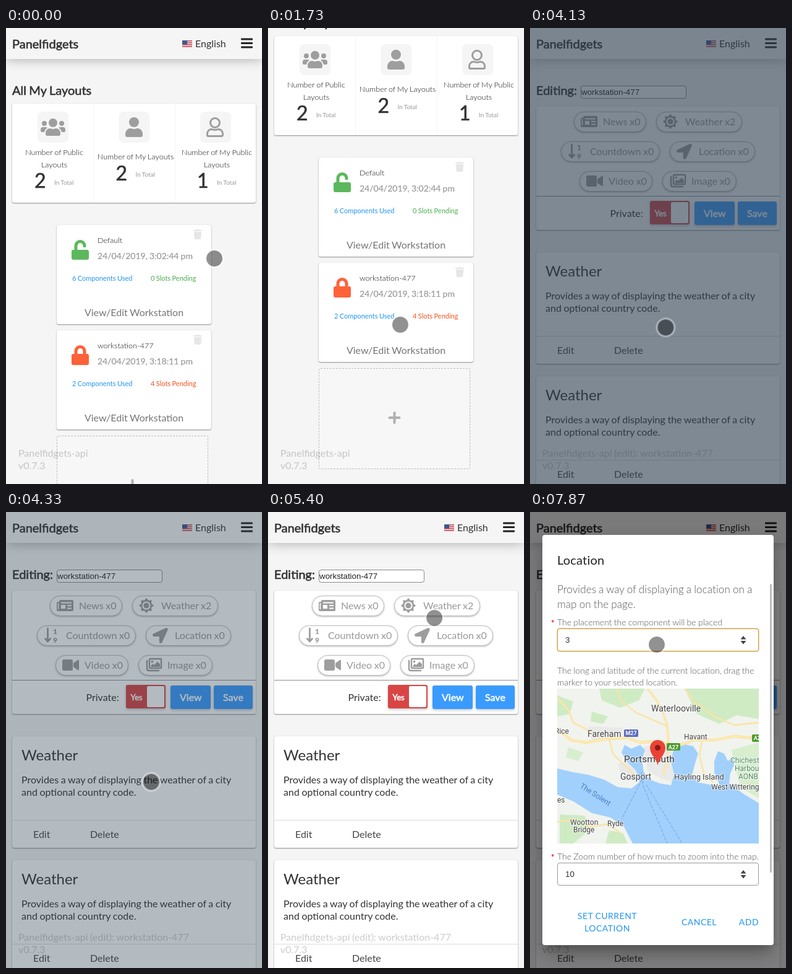
An HTML page for the animation above (8 s loop, 414 by 736 pixels).

```html
<!DOCTYPE html>
<html lang="en">
<head>
<meta charset="utf-8">
<title>Layout manager</title>
<style>
html,body{margin:0;width:100%;height:100%;overflow:hidden;background:#f5f5f5}
#stage{position:relative;width:414px;height:736px;overflow:hidden;background:#f5f5f5}
#stage div,.layer>svg{position:absolute;box-sizing:border-box}
.layer,.layer>svg{left:0;top:0;width:414px;height:736px}
.layer>svg{overflow:visible}
text{font-family:Lato,sans-serif;white-space:pre;word-spacing:-.035em}
text.ui{font-family:"Liberation Sans",Arial,sans-serif}
text.map{font-family:Roboto,sans-serif;paint-order:stroke;stroke:#fff;stroke-width:2px;stroke-opacity:.7}
.fat{stroke:currentColor;stroke-width:.6px}
.thin{font-weight:300}
.head{background:#f5f5f5;box-shadow:0 0 20px rgba(0,0,0,.32)}
.card{background:#fff;border-radius:3px;box-shadow:0 1px 2px rgba(0,0,0,.42),0 0 1px rgba(0,0,0,.2)}
.slot{border:1px dashed #bbb;border-radius:3px;background:#f7f7f7}
.chip{background:#fff;border:1px solid #bdbdbd;border-radius:17px;box-shadow:0 1px 3px rgba(0,0,0,.3)}
.name{background:#fff;border:1px solid #8a8a8a;border-radius:4px}
.btn{background:#3a9bff;border-radius:3px;box-shadow:0 2px 4px rgba(0,0,0,.22)}
.red{background:#d84545}
.knob{background:#fff;border-radius:2px}
.select{background:#fff;border:1px solid #9a9a9a;border-radius:4px}
.focus{border-color:#d09a38;box-shadow:0 0 1px 0.5px rgba(208,154,56,.7)}
.panel{background:#fff;border-radius:4px;box-shadow:0 11px 15px -7px rgba(0,0,0,.2),0 16px 30px rgba(0,0,0,.25)}
.tint{background:#f0f7ff}
.anim{animation:8s linear infinite}
#home{animation-name:home}
#scroll{animation-name:scroll}
#edit{animation-name:edit}
#hover{animation-name:hover}
#veil{background:#2c3e50;animation-name:veil}
#shade{background:rgba(0,0,0,.5);animation-name:shade}
#modal{transform-origin:207px 368px;animation-name:modal}
#map{animation-name:map}
#bar{background:#bdbdbd;border-radius:2px;animation-name:bar}
#cubes{animation-name:cubes}
.cube{left:187px;top:348px;width:15px;height:15px;background:#f8f8f8;animation-timing-function:ease-in-out}
#c1{animation-name:c1}
#c2{animation-name:c2}
#dot{left:-16px;top:-16px;width:32px;height:32px;border-radius:50%;border:3px solid rgba(255,255,255,.36);background:rgba(0,0,0,.43);background-clip:padding-box;animation-name:dot}
@keyframes home{0%,45%{visibility:visible}45.01%,100%{visibility:hidden}}
@keyframes edit{0%,45%{visibility:hidden}45.01%,100%{visibility:visible}}
@keyframes scroll{
0%,6.8%{transform:none;animation-timing-function:ease-in-out}
11.6%,12.7%{transform:translateY(-100px)}
15%,100%{transform:translateY(-109px)}}
@keyframes veil{0%,32.9%{opacity:0}41.6%,47.75%{opacity:1}57.7%,100%{opacity:0}}
@keyframes cubes{0%,47.75%{visibility:visible}47.76%,100%{visibility:hidden}}
@keyframes c1{
0%,31.5%{transform:none}
37.125%{transform:translate(42px,0) rotate(-90deg) scale(.5)}
42.75%{transform:translate(42px,42px) rotate(-180deg)}
48.375%,100%{transform:translate(0,42px) rotate(-270deg) scale(.5)}}
@keyframes c2{
0%,31.5%{transform:translate(42px,42px) rotate(-180deg)}
37.125%{transform:translate(0,42px) rotate(-270deg) scale(.5)}
42.75%{transform:translate(0,0) rotate(-360deg)}
48.375%,100%{transform:translate(42px,0) rotate(-450deg) scale(.5)}}
@keyframes hover{0%,82.6%{opacity:0}84.7%,100%{opacity:1}}
@keyframes shade{0%,85.7%{opacity:0}89.5%,100%{opacity:1}}
@keyframes modal{
0%,85.7%{opacity:0;transform:scale(.8);animation-timing-function:ease-out}
89.5%,100%{opacity:1;transform:none}}
@keyframes map{0%,89.8%{opacity:0}91.5%,100%{opacity:1}}
@keyframes bar{0%,93.6%{opacity:0}95.5%,100%{opacity:1}}
@keyframes dot{
0%,.2%{transform:translate(337px,372px)}
2.5%,4.5%{transform:translate(343px,349px);animation-timing-function:ease-in-out}
10%,18.4%{transform:translate(221px,267px)}
21.625%{transform:translate(214px,478px);animation-timing-function:ease-out}
24.4%{transform:translate(199px,584px);animation-timing-function:ease-in-out}
28.3%,49.5%{transform:translate(206px,524px)}
54.125%{transform:translate(235px,436px)}
58.3%{transform:translate(182px,305px);animation-timing-function:ease-out}
67.5%{transform:translate(269px,171px)}
69.1%,69.3%{transform:translate(278px,168px)}
75%{transform:translate(319px,193px)}
79.1%,93.5%{transform:translate(316px,206px);animation-timing-function:ease-in-out}
98.2%,100%{transform:translate(205px,214px)}}
</style>
</head>
<body>
<div id="stage"></div>
<script>
const GREY = '#9e9e9e', INK = '#333';
const box = (cls, x, y, w, h, attr = '') =>
  `<div class="${cls}" ${attr} style="left:${x}px;top:${y}px;width:${w}px;height:${h}px"></div>`;
const svg = (...parts) => `<svg viewBox="0 0 414 736">${parts.join('')}</svg>`;
const text = (x, y, str, size = 16, fill = INK, attr = '') =>
  `<text x="${x}" y="${y}" font-size="${size}" fill="${fill}" color="${fill}" ${attr}>${str}</text>`;
const icon = (name, x, y, scale, fill = GREY) =>
  `<path d="${ICONS[name]}" fill="${fill}" transform="translate(${x} ${y}) scale(${scale})"/>`;
const shape = (d, fill) => `<path d="${d}" fill="${fill}"/>`;
const line = (d, color, width, attr = '') =>
  `<path d="${d}" fill="none" stroke="${color}" stroke-width="${width}" ${attr}/>`;
const disc = (x, y, r, fill) => `<circle cx="${x}" cy="${y}" r="${r}" fill="${fill}"/>`;
const rect = (x, y, w, h, fill, r = 0) =>
  `<rect x="${x}" y="${y}" width="${w}" height="${h}" rx="${r}" fill="${fill}"/>`;
const FAT = 'class="fat"', THIN = 'class="thin"', MID = 'text-anchor="middle"';

const ICONS = {
  user: 'M224 256a128 128 0 1 0 0-256 128 128 0 0 0 0 256zm90 32h-17a175 175 0 0 1-146 0h-17A134 134 0 0 0 0 422v42a48 48 0 0 0 48 48h352a48 48 0 0 0 48-48v-42A134 134 0 0 0 314 288z',
  pals: 'M96 224a64 64 0 1 0 0-128 64 64 0 0 0 0 128zM544 224a64 64 0 1 0 0-128 64 64 0 0 0 0 128zM576 256h-64a64 64 0 0 0-45 19c40 22 69 62 75 109h66a32 32 0 0 0 32-32v-32a64 64 0 0 0-64-64zM173 275a64 64 0 0 0-45-19H64a64 64 0 0 0-64 64v32a32 32 0 0 0 32 32h66c6-47 35-87 75-109z',
  chief: 'M320 256a112 112 0 1 0 0-224 112 112 0 0 0 0 224zM397 288h-9a158 158 0 0 1-136 0h-9A115 115 0 0 0 128 403v29a48 48 0 0 0 48 48h288a48 48 0 0 0 48-48v-29A115 115 0 0 0 397 288z',
  unlock: 'M400 256H152V153a73 73 0 0 1 71-73 72 72 0 0 1 73 72v16a24 24 0 0 0 24 24h32a24 24 0 0 0 24-24v-16A152 152 0 0 0 72 153v103H48a48 48 0 0 0-48 48v160a48 48 0 0 0 48 48h352a48 48 0 0 0 48-48V304a48 48 0 0 0-48-48z',
  lock: 'M400 224h-24v-72a152 152 0 0 0-304 0v72H48a48 48 0 0 0-48 48v192a48 48 0 0 0 48 48h352a48 48 0 0 0 48-48V272a48 48 0 0 0-48-48zm-104 0H152v-72a72 72 0 0 1 144 0z',
  trash: 'M432 32H312l-9-19A24 24 0 0 0 281 0H167a24 24 0 0 0-22 13l-9 19H16A16 16 0 0 0 0 48v32a16 16 0 0 0 16 16h416a16 16 0 0 0 16-16V48a16 16 0 0 0-16-16zM53 467a48 48 0 0 0 48 45h246a48 48 0 0 0 48-45l21-339H32z',
  arrow: 'M444 4L29 195c-48 23-32 93 19 93h176v176c0 51 70 67 93 19L508 68c16-39-25-80-64-64z'
};

const head = box('head', 0, 0, 414, 50) + svg(
  text(10, 33, 'Panelfidgets', 20, INK, FAT),
  rect(285, 20, 16, 11, '#f3e9ea', 1),
  [0, 1, 2, 3].map(i => rect(285, 20 + i * 3, 16, 1.7, '#c9505a')).join(''),
  rect(285, 20, 8, 6.5, '#3f5690'),
  text(306, 31, 'English'),
  [16.5, 23, 29.5].map(y => rect(380, y, 19, 3, '#222', 1)).join(''));

const version = title => svg(text(20, 692, title, 16, 'rgba(0,0,0,.2)'), text(20, 712, 'v0.7.3', 16, 'rgba(0,0,0,.2)'));

// Home page
const stat = (cx, lines, count, y) =>
  rect(cx - 27, 135, 50, 50, '#f5f5f5', 8) +
  lines.map((s, i) => text(cx, y + i * 20, s, 12.6, '#111', THIN + MID)).join('') +
  text(cx - 32, y + (lines.length > 1 ? 53 : 34), count, 32, INK, FAT) +
  text(cx, y + (lines.length > 1 ? 48 : 28), 'In Total', 10, '#999');

const station = (y, lock, color, name, date, used, pending) =>
  icon(lock, 106, y + 24, .0625, color) + icon('trash', 303, y + 7, .03125, '#e6e6e6') +
  text(148, y + 29, name, 12.6, '#111', THIN) + text(148, y + 55, date, 14, '#999', 'class="fat" style="stroke-width:.2px"') +
  text(107, y + 90, used + ' Components Used', 11, '#2196f3') +
  text(234, y + 90, pending + ' Slots Pending', 11, pending ? '#f4511e' : '#4caf50') +
  text(207, y + 147, 'View/Edit Workstation', 16, '#757575', MID);

const home = `<div class="layer anim" id="home"><div class="layer anim" id="scroll">` +
  box('card', 10, 122, 394, 160) + box('card', 82, 318, 250, 160) + box('card', 82, 488, 250, 160) +
  box('slot', 82, 658, 245, 163) +
  svg(
    text(10, 108, 'All My Layouts', 20, INK, FAT),
    line('M141.5 122V282M273.5 122V282', '#f3f3f3', 1),
    stat(78, ['Number of Public', 'Layouts'], 2, 205),
    stat(209.5, ['Number of My Layouts'], 2, 212),
    stat(341, ['Number of My Public', 'Layouts'], 1, 205),
    icon('pals', 56, 144, .0625), icon('chief', 56, 144, .0625), icon('user', 193, 144, .0625),
    `<g transform="translate(324 144)" fill="none" stroke="${GREY}" stroke-width="3"><circle cx="14" cy="9" r="7.5"/><path d="M1.5 29v-2.6a6.9 6.9 0 0 1 6.9-6.9c1.8 0 2.6 1 5.6 1s3.8-1 5.6-1a6.9 6.9 0 0 1 6.9 6.9V29a1.5 1.5 0 0 1-1.5 1.5H3A1.5 1.5 0 0 1 1.5 29z"/></g>`,
    station(318, 'unlock', '#5cb85c', 'Default', '24/04/2019, 3:02:44 pm', 6, 0),
    station(488, 'lock', '#ff6139', 'workstation-477', '24/04/2019, 3:18:11 pm', 2, 4),
    line('M196.5 738H212.5M204.5 730V746', '#b0b0b0', 4, 'stroke-linecap="round"')) +
  head + '</div>' + version('Panelfidgets-api') + '</div>';

// Editor page
const star = Array.from({length: 16}, (_, i) => {
  const a = i * Math.PI / 8, r = i % 2 ? 8.8 : 12.2;
  return (227 + r * Math.cos(a)).toFixed(2) + ' ' + (151 + r * Math.sin(a)).toFixed(2);
}).join('L');

const widget = y =>
  text(25, y + 39, 'Weather', 24) +
  text(25, y + 76, 'Provides a way of displaying the weather of a city') +
  text(25, y + 96, 'and optional country code.') +
  line(`M10 ${y + 135.5}H404`, '#ddd', 1) +
  text(44, y + 164, 'Edit', 16, '#444') + text(136, y + 164, 'Delete', 16, '#444');

const chips = [
  [71, 135, 117, 118, 'News'], [204, 135, 139, 251, 'Weather'],
  [50, 183, 160, 97, 'Countdown'], [226, 183, 138, 273, 'Location'],
  [80, 231, 118, 127, 'Video'], [214, 231, 120, 261, 'Image']];

const edit = '<div class="layer anim" id="edit">' +
  box('name', 82, 93, 171, 21) + box('card', 10, 127, 394, 199) +
  chips.map(([x, y, w]) => box('chip', x, y, w, 33)).join('') +
  box('btn red', 194, 279, 64, 38) + box('knob', 228, 281, 28, 34) +
  box('btn', 266, 280, 65, 38) + box('btn', 336, 280, 63, 38) +
  box('card', 10, 362, 394, 180) + box('card', 10, 562, 394, 180) +
  svg(
    text(10, 108, 'Editing:', 20, INK, FAT),
    text(83, 108, 'workstation-477', 13.33, '#222', 'class="ui"'),
    chips.map(([, y, , tx, s]) => text(tx, y + 22, `${s} x${s === 'Weather' ? 2 : 0}`, 16, '#999')).join(''),
    // newspaper
    rect(82, 145, 8, 15, GREY, 2), rect(86, 142, 23, 18, GREY, 2),
    line('M84.5 147V157', '#fff', 1.5),
    line('M89 146.5H106M99 151H106M99 155.5H106', '#fff', 1.8), rect(89, 150, 7, 6, '#fff'),
    // sun
    shape(`M${star}z`, GREY), disc(227, 151, 6.6, '#fff'), disc(227, 151, 4.6, GREY),
    // sorting arrow
    line('M67.5 188V209M63.5 204.5L67.5 209L71.5 204.5', GREY, 2.8, 'stroke-linecap="round" stroke-linejoin="round"'),
    text(76, 197, '1', 12, GREY, 'font-weight="900"'), text(76, 211, '9', 12, GREY, 'font-weight="900"'),
    icon('arrow', 237, 187, .0485),
    // camera
    rect(91, 238, 17, 18, GREY, 2.5), shape('M109 244L116 239Q118 238 118 240V254Q118 256 116 255L109 250z', GREY),
    // pictures
    line('M228 240V253Q228 256 231 256H247', GREY, 2.5, 'stroke-linecap="round"'),
    line('M233 237H250Q251 237 251 238V251Q251 252 250 252H233Q232 252 232 251V238Q232 237 233 237z', GREY, 2.4),
    disc(236.5, 241.5, 1.8, GREY), shape('M234.5 250V248L237.5 245L239.5 247L245 241.5L249 245.5V250z', GREY),
    line('M10 271.5H404', '#8f8f8f', 1),
    text(129.5, 305, 'Private:'),
    text(201.5, 304, 'Yes', 13, '#fff', FAT),
    text(281, 305, 'View', 16, '#fff', FAT), text(351, 305, 'Save', 16, '#fff', FAT),
    widget(362), widget(562)) +
  '<div class="layer anim" id="hover">' + box('chip tint', 226, 183, 138, 33) +
  svg(icon('arrow', 237, 187, .0485, '#2491fb'), text(273, 205, 'Location x0', 16, '#999')) + '</div>' +
  head + version('Panelfidgets-api (edit): workstation-477') + '</div>';

// Dialog with map
const place = (x, y, s, size = 12, fill = '#444') => text(x, y, s, size, fill, 'class="map"');
const badge = (x, y, w, s, fill) => rect(x, y, w, 12, fill, 2) +
  text(x + w / 2, y + 9.5, s, 9, '#fff', MID + ' font-weight="700" style="font-family:Roboto,sans-serif"');
const road = (d, w = 2) => line(d, '#f5d98c', w + .8, 'stroke-linejoin="round"') + line(d, '#fdeaae', w, 'stroke-linejoin="round"');
const LAND = '#f1f3ee', WATER = '#a1d0fd', WOOD = '#cfebc4';

const map = `<svg x="44" y="285" width="326" height="250" viewBox="44 285 326 250"><g class="anim" id="map">` + [
  rect(44, 285, 326, 250, LAND),
  shape('M112 285H186L176 304L146 316L116 304zM250 285H370V334L334 328L306 342L270 326zM44 296L70 306L64 326L44 330zM100 322L126 330L118 342L98 338z', WOOD),
  shape('M326 384L370 372V462L340 444zM62 380L86 388L78 402L58 396z', '#d8eece'),
  shape('M184 378L230 380L232 436L212 430L190 418zM142 406L174 402L180 430L150 434zM94 346L150 348L146 366L100 370z', '#e9e9e9'),
  // sea and harbours
  shape('M44 414L70 420L94 424L120 432L142 444L164 446L177 436L172 418L156 402L148 388L153 376L164 382L178 376L186 384L181 400L184 420L194 432L210 438L228 441L233 424L228 402L232 384L246 374L264 378L272 390L268 402L262 424L270 436L296 441L308 444L298 420L298 402L304 386L314 390L320 402L328 396L330 408L324 422L322 438L344 454L370 470V535H166L152 508L130 493L100 486L70 467L44 456z', WATER),
  shape('M48 488L88 490L98 512L70 535H48zM128 514L150 518L158 535H122z', WOOD),
  road('M44 350L66 368L92 372L128 366L156 364L178 372L204 370L240 377L266 368L298 368L330 362L370 366', 3.5),
  road('M190 285L206 306L216 326L222 346L224 374L222 398L216 424', 2.5),
  road('M44 300L62 320L70 340L90 350L112 364'),
  road('M128 366L134 390L150 406L168 424', 1.5),
  road('M250 285L264 304L298 330L330 344L370 340', 1.5),
  road('M278 370L274 394L282 424L296 436', 1.5),
  road('M44 500L72 496L96 508L126 504L146 518', 1.5),
  road('M140 285L148 306L172 324L222 346', 1.2),
  line('M180 420L183 442L222 535M181 432L148 496M188 440L246 535', '#6f9fe8', 1, 'stroke-dasharray="5 2"'),
  place(196, 322, 'Waterlooville', 14), place(93, 363, 'Fareham', 14),
  place(40, 358, 'Rice', 12), place(249, 367, 'Havant', 12),
  place(152, 404, 'Portsmouth', 15.5, '#333'), place(146, 432, 'Gosport', 14),
  place(233, 432, 'Hayling Island', 13), place(293, 448, 'West Wittering', 12),
  place(44, 469, 'es', 12), place(65, 505, 'Wootton', 12), place(70, 517, 'Bridge', 12), place(125, 507, 'Ryde', 12),
  place(324, 405, 'Chichester', 12, '#4f8a60'), place(331, 418, 'Harbour', 12, '#4f8a60'), place(337, 431, 'AONB', 12, '#4f8a60'),
  text(80, 444, 'The Solent', 12, '#4a7fc4', 'transform="rotate(33 80 444)" style="font-family:Roboto,sans-serif"'),
  badge(152, 351, 23, 'M27', '#5c6bc0'), badge(221, 373, 22, 'A27', '#4a9a2e'), badge(359, 359, 22, 'A27', '#4a9a2e'),
  shape('M206.5 409C205 398 194 392 194 380.5A12.5 12.5 0 0 1 219 380.5C219 392 208 398 206.5 409z', '#ea4335'),
  disc(206.5, 380.5, 4.6, '#8c1b14')
].join('') + '</g></svg>';

const spacing = n => ` letter-spacing="${n}"`;
const label = (y, s, must) => (must ? text(34, y + 1, '*', 13, '#e02020', 'font-weight="700"') : '') +
  text(44, y, s, 14, '#555', THIN);
const pick = (y, s) => text(57, y, s, 13.33, INK, 'class="ui"') +
  shape(`M340.5 ${y - 5.5}L345 ${y - 11}L349.5 ${y - 5.5}zM340.5 ${y - 3}L345 ${y + 2.5}L349.5 ${y - 3}z`, '#444');
const action = (x, y, s) => text(x, y, s, 14, '#2196f3', MID + spacing(.5));
const intro = (y, s) => text(44, y, s, 17, '#555', THIN + spacing(.1));

const modal = '<div class="layer anim" id="shade"></div><div class="layer anim" id="modal">' +
  box('panel', 20, 37, 374, 662) + box('select focus', 44, 188, 326, 37) + box('select', 44, 566, 326, 37) +
  svg(
    text(44, 85, 'Location', 20, '#222', spacing(.2)),
    intro(131, 'Provides a way of displaying a location on a'), intro(155, 'map on the page.'),
    label(183, 'The placement the component will be placed', true), pick(211, 3),
    label(261, 'The long and latitude of the current location, drag the'),
    label(280, 'marker to your selected location.'),
    rect(44, 285, 326, 250, '#e5e3df'), map,
    label(561, 'The Zoom number of how much to zoom into the map.', true), pick(589, 10),
    action(125, 657, 'SET CURRENT'), action(125, 677, 'LOCATION'),
    action(273.5, 667, 'CANCEL'), action(354, 667, 'ADD')) +
  box('anim', 388, 116, 3, 466, 'id="bar"') + '</div>';

const veil = `<div class="layer anim" id="veil"><div class="layer anim" id="cubes">
  <div class="cube anim" id="c1"></div><div class="cube anim" id="c2"></div></div></div>`;

document.getElementById('stage').innerHTML = home + edit + modal + veil + '<div class="anim" id="dot"></div>';
</script>
</body>
</html>
```
